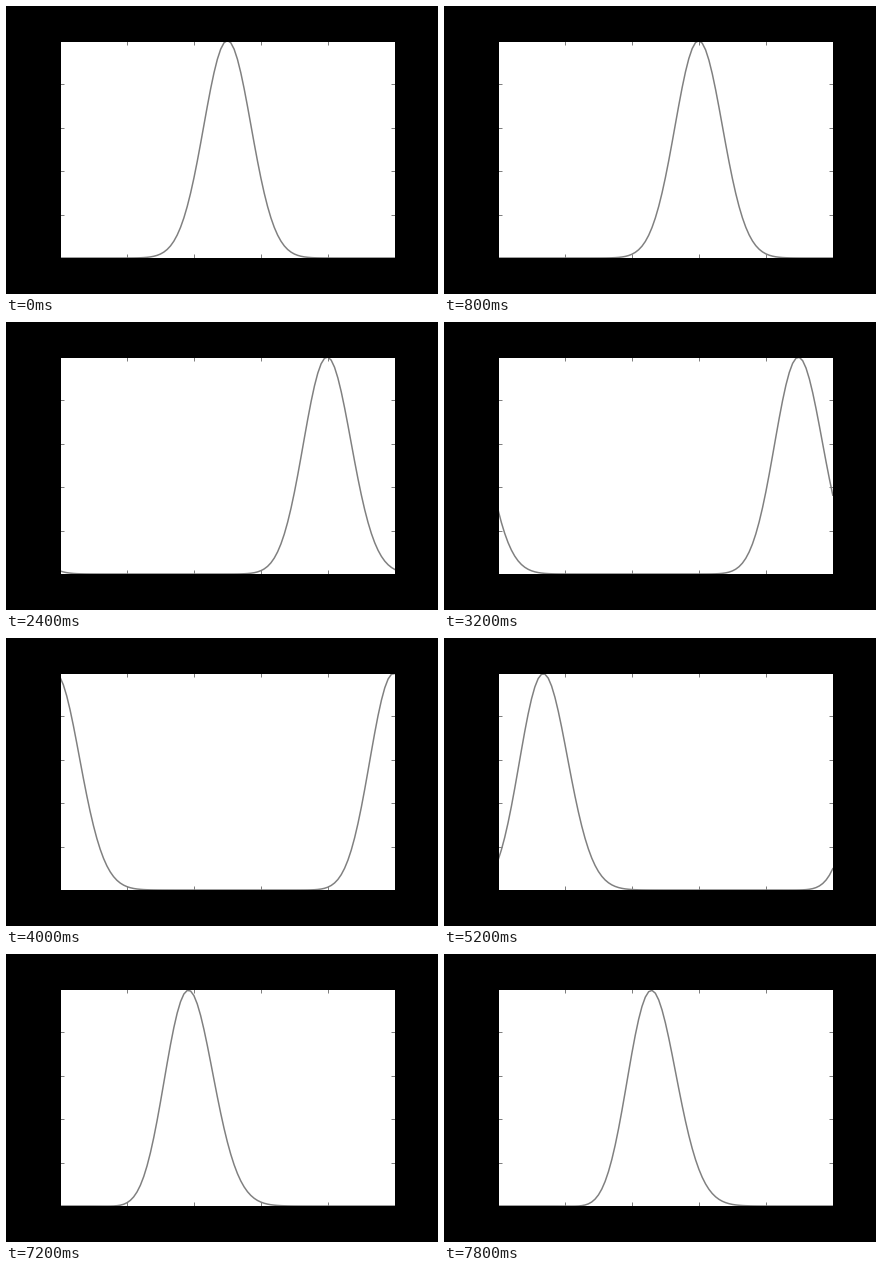
Recreate the animation shown at these times as a matplotlib script. Size 432x288 px, loop 8 s.

```python
import matplotlib.pyplot as plt
import numpy as np
from matplotlib.animation import FuncAnimation

FRAMES, INTERVAL = 40, 200
POINTS = 101
COURANT = 0.5
STEPS = 5  # solver steps per frame, moving the pulse by 0.025

x = np.linspace(0, 1, POINTS)


def step(u):
    """One Lax-Wendroff step to the right on a periodic grid."""
    left, right = np.roll(u, 1), np.roll(u, -1)
    return (u - COURANT / 2 * (right - left)
            + COURANT ** 2 / 2 * (right - 2 * u + left))


def solve():
    u = np.exp(-100 * (x - 0.5) ** 2)
    waves = [u]
    for _ in range(FRAMES - 1):
        for _ in range(STEPS):
            u = step(u)
        waves.append(u)
    return waves


waves = solve()

fig = plt.figure(figsize=(6, 4), dpi=72, facecolor="black")
ax = fig.add_axes([0.125, 0.125, 0.775, 0.755], facecolor="white")
ax.set(xlim=(0, 1), ylim=(0, 1),
       xticks=np.linspace(0, 1, 6), yticks=np.linspace(0, 1, 6))
ax.tick_params(direction="in", length=4, width=0.5, top=True, right=True,
               labelbottom=False, labelleft=False)
for spine in ax.spines.values():
    spine.set_linewidth(1)
line, = ax.plot(x, waves[0], color="0.5", lw=1.5)


def draw(i):
    line.set_ydata(waves[i])
    return line,


anim = FuncAnimation(fig, draw, frames=FRAMES, interval=INTERVAL,
                     repeat=True, repeat_delay=0)
plt.show()
```
